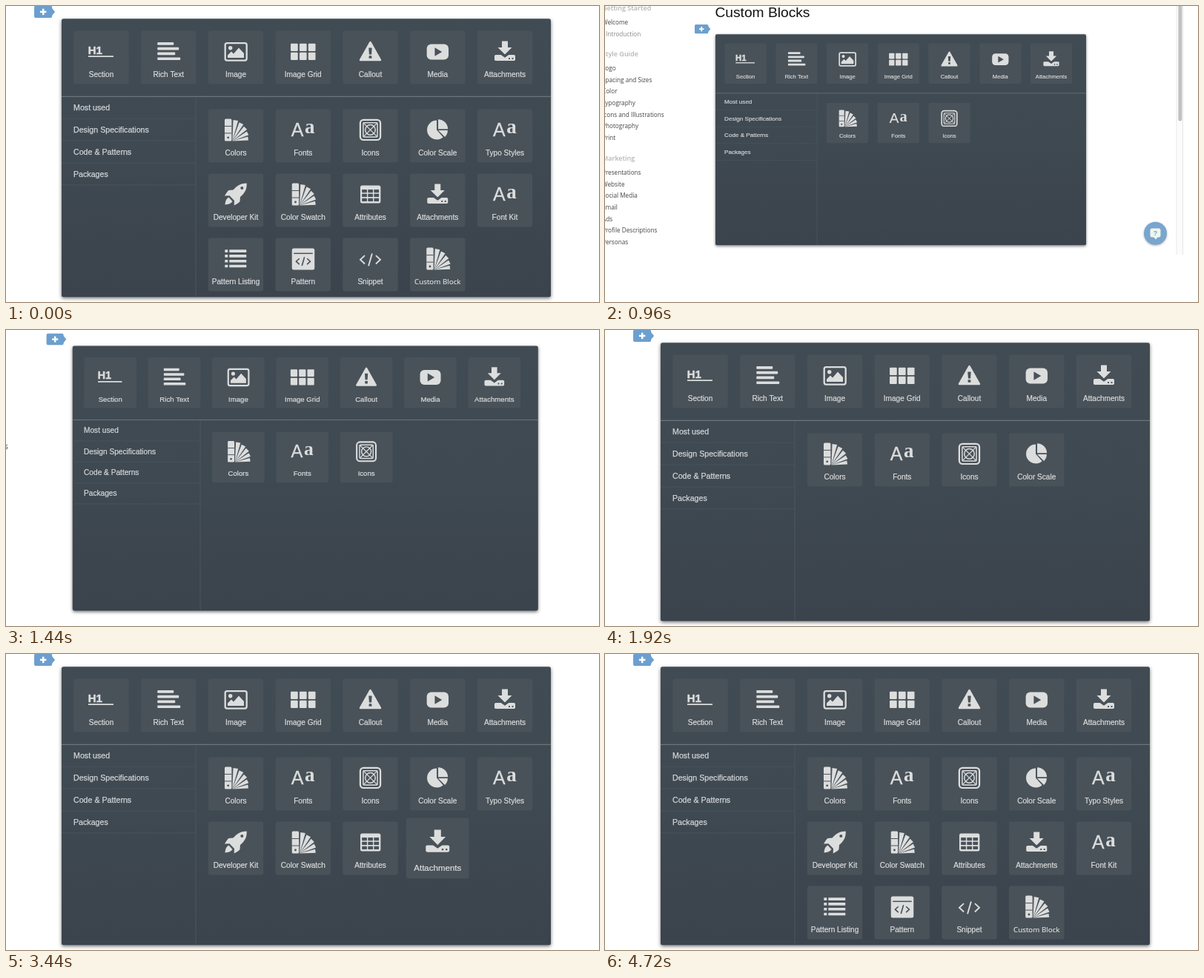
Animation of 800 by 400 pixels, one loop 4.8 s. Source, as an HTML page with a canvas:

```html
<!DOCTYPE html>
<html lang="en">
<head>
<meta charset="utf-8">
<title>Block picker</title>
<style>
  html, body { margin: 0; width: 100%; height: 100%; overflow: hidden; background: #fff; }
  canvas { display: block; width: 800px; height: 400px; }
</style>
</head>
<body>
<canvas id="stage" width="800" height="400"></canvas>
<script>
const ctx = document.getElementById('stage').getContext('2d');
const LOOP = 4800, STEP = 80, ZOOM = 1.32;
const LIGHT = '#dcdddd', TILE = '#495259';
const SANS = '"Liberation Sans", Arial, sans-serif';
const SERIF = '"Liberation Serif", Times, serif';
const HUMANIST = '"Open Sans", "Noto Sans", sans-serif';

// --- drawing helpers ---
function rect(x, y, w, h, r = 0, color = LIGHT) {
  ctx.fillStyle = color;
  ctx.beginPath();
  ctx.roundRect(x, y, w, h, r);
  ctx.fill();
}

function frame(x, y, w, h, r, width, color = LIGHT) {
  ctx.strokeStyle = color;
  ctx.lineWidth = width;
  ctx.beginPath();
  ctx.roundRect(x, y, w, h, r);
  ctx.stroke();
}

function disc(x, y, r, color = LIGHT) {
  ctx.fillStyle = color;
  ctx.beginPath();
  ctx.arc(x, y, r, 0, Math.PI * 2);
  ctx.fill();
}

function trace(points) {
  ctx.beginPath();
  for (let i = 0; i < points.length; i += 2) ctx.lineTo(points[i], points[i + 1]);
}

function poly(points, color = LIGHT) {
  trace(points);
  ctx.closePath();
  ctx.fillStyle = color;
  ctx.fill();
}

function line(points, width, color = LIGHT) {
  trace(points);
  ctx.strokeStyle = color;
  ctx.lineWidth = width;
  ctx.stroke();
}

function text(str, x, y, font, color = LIGHT, align = 'left', weight = 0) {
  ctx.font = font;
  ctx.textAlign = align;
  ctx.fillStyle = color;
  ctx.fillText(str, x, y);
  if (weight) {
    ctx.strokeStyle = color;
    ctx.lineWidth = weight;
    ctx.strokeText(str, x, y);
  }
}

function codeMark(size, width, color) {
  const s = size;
  line([-.55 * s, -.42 * s, -s, 0, -.55 * s, .42 * s], width, color);
  line([.55 * s, -.42 * s, s, 0, .55 * s, .42 * s], width, color);
  line([.18 * s, -.62 * s, -.18 * s, .62 * s], width, color);
}

// --- icons, each centred on 0,0 ---
const icons = {
  heading() {
    text('H1', -17.8, 3, 'bold 15px ' + SANS, LIGHT, 'left', .5);
    rect(-17.5, 5.7, 34, 1.8);
  },
  lines() {
    [22, 29, 24, 31].forEach((w, i) => rect(-15, -12.5 + i * 6.8, w, 3.7, 1));
  },
  image() {
    frame(-14.3, -11.3, 29, 23.4, 2.5, 2.3);
    disc(-7.3, -4.8, 2.7);
    poly([-11, 8.5, -11, 5, -6, 0, -3, 3, 4, -5, 11, 2.5, 11, 8.5]);
  },
  grid() {
    for (let i = 0; i < 6; i++)
      rect(-16.7 + i % 3 * 11.9, -10.7 + (i / 3 | 0) * 12, 9.7, 10.2, 1);
  },
  warning() {
    const shape = [0, -12.3, 13.4, 11.5, -13.4, 11.5];
    poly(shape);
    ctx.lineJoin = 'round';
    trace(shape);
    ctx.closePath();
    ctx.strokeStyle = LIGHT;
    ctx.lineWidth = 2.6;
    ctx.stroke();
    poly([-2.2, -5, 2.2, -5, 1.6, 4, -1.6, 4], TILE);
    rect(-1.9, 5.7, 3.8, 3.6, .6, TILE);
  },
  media() {
    rect(-14.6, -10, 29.4, 21, 6);
    poly([-3.8, -5.3, 6, .5, -3.8, 6.3], TILE);
  },
  download() {
    poly([-4, -14, 4, -14, 4, -5.5, 9.5, -5.5, 0, 4, -9.5, -5.5, -4, -5.5]);
    rect(-14, 4.5, 28, 8, 1.8);
    poly([-6, 4, 0, 8.3, 6, 4], TILE);
    rect(5, 8.4, 2, 2, .5, TILE);
    rect(9.5, 8.4, 2, 2, .5, TILE);
  },
  swatch() {
    rect(-15, -15, 9.4, 30, 1.5);
    rect(-15, -5.5, 9.4, 1, 0, TILE);
    rect(-15, 4, 9.4, 1, 0, TILE);
    disc(-10.3, 10.4, 1.4, TILE);
    const px = -4.6, py = 15, blades = 5;
    for (let i = 0; i < blades; i++) {
      const r = 28.5 - i * 1.7, gap = .04;
      const a = (i / blades) * Math.PI / 2 + gap, b = ((i + 1) / blades) * Math.PI / 2 - gap;
      poly([px, py, px + r * Math.sin(a), py - r * Math.cos(a),
        px + r * Math.sin(b), py - r * Math.cos(b)]);
    }
  },
  letters() {
    text('A', -16, 8.5, '25px ' + SANS, LIGHT, 'left', .3);
    text('a', 2.3, 5, 'bold 27px ' + SERIF);
  },
  target() {
    frame(-13.6, -13.6, 27.2, 27.2, 4.5, 2.2);
    frame(-9.6, -9.6, 19.2, 19.2, 1.5, 1.5);
    line([-9.5, -9.5, 9.5, 9.5], 1.3);
    line([9.5, -9.5, -9.5, 9.5], 1.3);
    frame(-6.8, -6.8, 13.6, 13.6, 6.8, 1.5);
  },
  pie() {
    const slice = (x, y, r, from, to) => {
      ctx.fillStyle = LIGHT;
      ctx.beginPath();
      ctx.moveTo(x, y);
      ctx.arc(x, y, r, from * Math.PI, to * Math.PI);
      ctx.fill();
    };
    slice(-1.2, 0, 13, .27, 1.5);
    slice(.8, -1.2, 13, -.5, 0);
    slice(.8, .5, 12.8, 0, .25);
  },
  rocket() {
    ctx.fillStyle = LIGHT;
    ctx.fill(new Path2D('M14.8-15C7-15 2-12-3.5-6L-9.5-5.5Q-11-5-15 2L-8.5 1.8L-2 8.5' +
      'L-2.3 15Q5 11 5.5 9.5L6 3.5C12.5-2 15-7 14.8-15Z'));
    ctx.fill(new Path2D('M-9.5 4Q-14 6-14.5 14Q-7 13.5-4.5 9.5Z'));
    disc(8.3, -8.5, 2, TILE);
  },
  table() {
    rect(-13.5, -12, 27.4, 24, 2.5);
    for (let i = 0; i < 9; i++)
      rect(-11.3 + i % 3 * 8.1, -6.6 + (i / 3 | 0) * 5.9, 6.7, 4.3, .4, TILE);
  },
  list() {
    for (let i = 0; i < 4; i++) {
      rect(-14.7, -12.3 + i * 6.8, 4, 3.6, .6);
      rect(-8.7, -12.3 + i * 6.8, 23, 3.6, .6);
    }
  },
  pattern() {
    rect(-15, -14, 30.5, 29, 2.5);
    rect(-12.5, -8, 25.5, 1.5, 0, TILE);
    ctx.translate(.2, 3.6);
    codeMark(9.5, 1.6, TILE);
  },
  code() {
    ctx.translate(0, 1.2);
    codeMark(13.5, 1.9, LIGHT);
  }
};

// --- content: label, icon, [appears at, steps until settled] ---
const tools = [
  ['Section', 'heading'], ['Rich Text', 'lines'], ['Image', 'image'], ['Image Grid', 'grid'],
  ['Callout', 'warning'], ['Media', 'media'], ['Attachments', 'download']
];
const blocks = [
  ['Colors', 'swatch'], ['Fonts', 'letters'], ['Icons', 'target'],
  ['Color Scale', 'pie', 1840, 1], ['Typo Styles', 'letters', 2480, 3],
  ['Developer Kit', 'rocket', 2880, 2], ['Color Swatch', 'swatch', 3040, 2],
  ['Attributes', 'table', 3200, 2], ['Attachments', 'download', 3360, 2],
  ['Font Kit', 'letters', 3520, 2], ['Pattern Listing', 'list', 3760, 2],
  ['Pattern', 'pattern', 3920, 2], ['Snippet', 'code', 4000, 2],
  ['Custom Block', 'swatch', 4080, 1]
];
const categories = ['Most used', 'Design Specifications', 'Code & Patterns', 'Packages'];
const menu = [
  [3, 'Getting Started', 'Welcome', 'Introduction'],
  [65, 'Style Guide', 'Logo', 'Spacing and Sizes', 'Color', 'Typography',
    'Icons and Illustrations', 'Photography', 'Print'],
  [206, 'Marketing', 'Presentations', 'Website', 'Social Media', 'Email', 'Ads',
    'Profile Descriptions', 'Personas']
];

function drawTile(x, y, label, icon, scale = 1, alpha = 1) {
  ctx.save();
  ctx.translate(x, y);
  ctx.scale(scale, scale);
  ctx.globalAlpha = alpha;
  rect(-37.2, -36, 74.4, 72, 3, TILE);
  const font = label === 'Custom Block' ? '9.8px ' + HUMANIST : '10.1px ' + SANS;
  text(label, 0, 26.8, font, LIGHT, 'center', .2);
  ctx.translate(0, -8);
  icons[icon]();
  ctx.restore();
}

// A block fades in, swells, then settles.
function drawBlock([label, icon, start = 0, steps = 0], i, t) {
  const k = (t - start) / STEP;
  if (k < 0) return;
  let scale = 1, alpha = 1;
  if (k < steps) {
    if (k < 1) alpha = .6;
    else scale = 1 + .14 * (steps - k) / (steps - 1);
  }
  drawTile(235 + i % 5 * 90.75, 158.2 + (i / 5 | 0) * 87.1, label, icon, scale, alpha);
}

function drawPanel(t, k) {
  const fill = ctx.createLinearGradient(0, 0, 0, 376);
  fill.addColorStop(0, '#414b53');
  fill.addColorStop(.5, '#3f4951');
  fill.addColorStop(1, '#3b434d');
  ctx.save();
  ctx.shadowColor = 'rgba(0,0,0,.55)';
  ctx.shadowBlur = 5 * k;
  ctx.shadowOffsetY = 1.8 * k;
  rect(0, 0, 660, 376, 2.5, fill);
  ctx.restore();

  rect(0, 104.6, 660, 1.2, 0, '#6b747a');
  rect(180.5, 106, 1, 270, 0, '#4d575e');
  categories.forEach((name, i) => {
    const y = 120 + i * 29.8;
    text(name, 16, y + 4, '10.67px ' + SANS, '#d3d6d8', 'left', .25);
    rect(0, y + 14.6, 180.5, 1, 0, '#48525a');
  });
  tools.forEach(([label, icon], i) => drawTile(53.5 + i * 90.75, 52.3, label, icon));
  blocks.forEach((b, i) => drawBlock(b, i, t));
}

function drawMenu() {
  for (const [top, head, ...items] of menu) {
    text(head, -4, top + 3.3, '600 9px ' + HUMANIST, '#b4b4b4');
    items.forEach((name, i) => {
      const sub = name === 'Introduction';
      text(name, sub ? 1 : -4, top + 22 + i * 15.65, '8.2px ' + HUMANIST, sub ? '#888' : '#444');
    });
  }
}

function drawChat(k) {
  ctx.save();
  ctx.shadowColor = 'rgba(0,0,0,.3)';
  ctx.shadowBlur = 3 * k;
  ctx.shadowOffsetY = k;
  disc(742.5, 307.3, 15.5, '#79a5ce');
  ctx.restore();
  rect(735.5, 300.5, 14, 12, 2.5, '#eef6ee');
  poly([740, 312, 746, 312, 743, 315.5], '#eef6ee');
  text('?', 742.5, 310, 'bold 9px ' + SANS, '#79a5ce', 'center');
}

function drawTag() {
  rect(121, 25, 18.3, 12.2, 1.5, '#6c9fcf');
  poly([138.5, 26.5, 142.3, 31.2, 138.5, 35.8], '#6c9fcf');
  rect(127, 30.2, 6.4, 1.9, 0, '#fff');
  rect(129.25, 27.95, 1.9, 6.4, 0, '#fff');
}

function drawPage(k) {
  text('Custom Blocks', 148.5, 15.2, '19.2px ' + SANS, '#111');
  drawMenu();
  rect(771, -10, 9, 346, 0, '#fbfbfb');
  rect(770.5, -10, 1, 346, 0, '#e9e9e9');
  rect(779, -10, 1, 346, 0, '#e6e6e6');
  rect(773.4, -10, 5, 165.5, 2.5, '#c1c1c1');
  drawChat(k);
  drawTag();
}

function draw(now) {
  let t = Math.floor(now % LOOP / STEP) * STEP;
  if (t === 0) t = LOOP; // the loop opens on the finished picker
  const p = Math.min(1, Math.max(0, (t - 1120) / 400));
  const k = 1 + (ZOOM - 1) * p;
  const x = 149 - 74 * p, y = 38.2 - 21 * p;

  ctx.setTransform(1, 0, 0, 1, 0, 0);
  rect(0, 0, 800, 400, 0, '#fff');
  ctx.setTransform(k, 0, 0, k, x, y);
  ctx.translate(-149, -38.2);
  drawPage(k);
  ctx.setTransform(k / ZOOM, 0, 0, k / ZOOM, x, y);
  drawPanel(t, k / ZOOM);
}

function tick() {
  draw(performance.now());
  requestAnimationFrame(tick);
}
tick();
</script>
</body>
</html>
```
